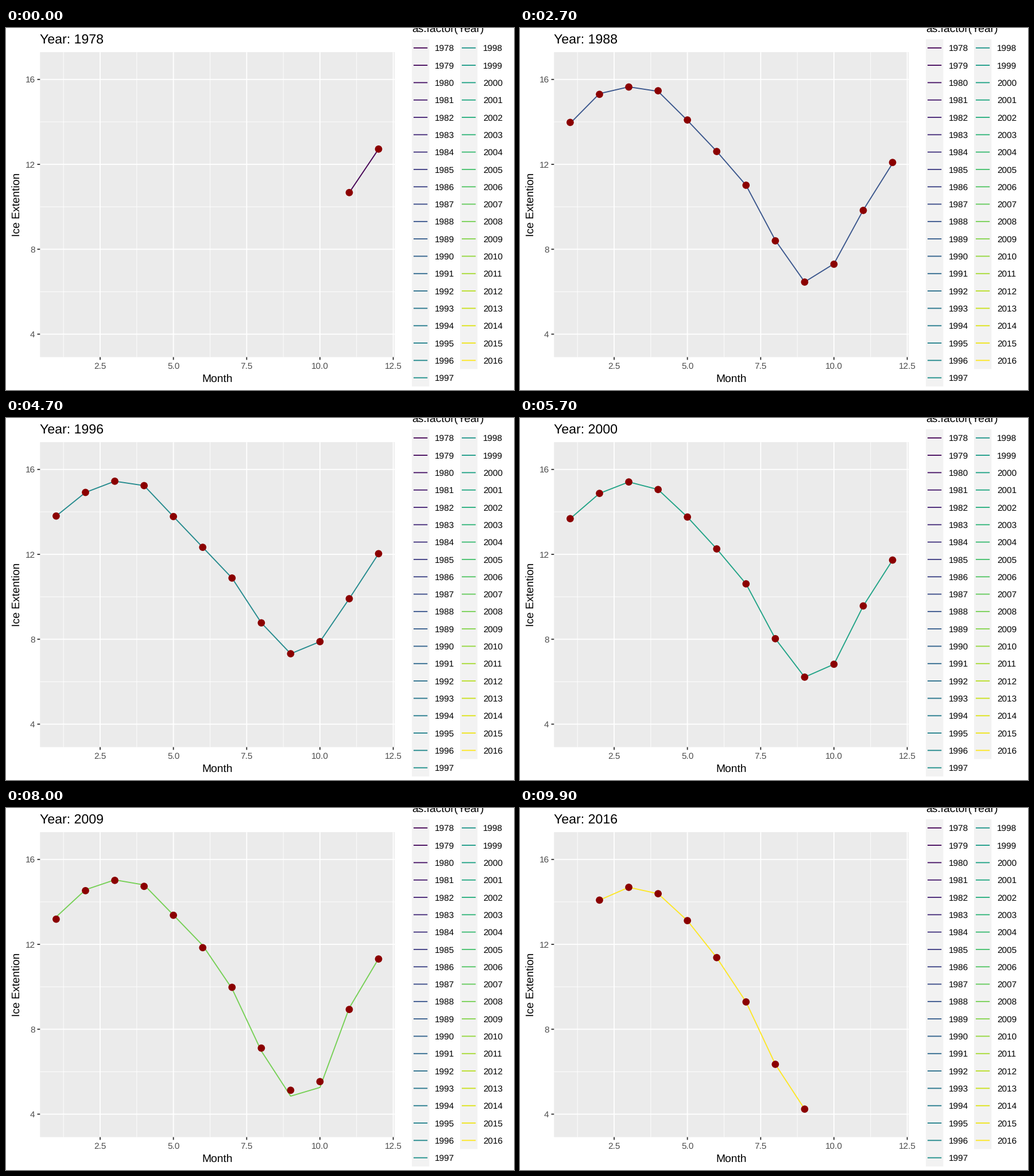
Write a matplotlib script that moves like this. It is 885 by 632 pixels and loops after 10 s.

```python
import matplotlib.pyplot as plt
import numpy as np
from matplotlib.animation import FuncAnimation
from matplotlib.patches import Circle, Rectangle

plt.rcParams.update({
    "font.family": "Liberation Sans",
    "text.hinting": "none",
    "path.snap": False,
})

W, H, DPI = 885, 632, 64
PX = 72 / DPI  # points per pixel
FRAMES = 100
YEARS = np.arange(1978, 2017)
MONTHS = np.arange(1, 13)
COLORS = plt.cm.viridis(np.linspace(0, 1, len(YEARS)))
LEFT, RIGHT, TOP, BOTTOM = 59.3, 677.2, 42.2, 574.6
STROKE = 1.87
BIG, MID, SMALL = 23.15, 19.3, 15.4  # text heights in pixels

# Typical seasons at both ends of the record
EARLY = np.array([14.15, 15.4, 15.75, 15.55, 14.15, 12.75, 11.3, 8.85, 7.15, 8.05, 10.1, 12.3])
LATE = np.array([12.75, 14.1, 14.75, 14.4, 13.1, 11.5, 9.3, 6.45, 4.4, 4.55, 8.6, 10.9])
# Turning points of the autumn low around its trend
SWING = {1979: .1, 1984: -.25, 1990: -.5, 1992: .6, 1993: -.25, 1996: 1,
         2000: .2, 2007: -.95, 2009: .1, 2012: -1.25, 2014: .5, 2016: -.1}


def to_x(month):
    return 36.35 + 51.06 * month


def to_y(extent):
    return 89.8 + 37.06 * (16 - extent)


def season(year, rng):
    """Monthly extents: a melting trend, an autumn swing and a little noise."""
    melt = ((year - 1979) / 37) ** 1.6
    swing = np.interp(year, list(SWING), list(SWING.values()))
    autumn = np.exp(-((MONTHS - 9.2) / 1.6) ** 2)
    return EARLY + (LATE - EARLY) * melt + swing * autumn + rng.normal(0, .05, 12)


def build_tracks():
    """Pixel positions of the monthly points, one array per year."""
    rng = np.random.default_rng(4)
    tracks = [np.column_stack([to_x(MONTHS[10:]), to_y(np.array([10.67, 12.72]))])]
    tracks += [np.column_stack([to_x(MONTHS), to_y(season(y, rng))]) for y in YEARS[1:]]
    tracks[-1] = tracks[-1][1:9]  # the last year runs from February to September
    return tracks


TRACKS = build_tracks()
KEYS = np.round((FRAMES - 1) * np.arange(len(YEARS)) / (len(YEARS) - 1)).astype(int)

fig = plt.figure(figsize=(W / DPI, H / DPI), dpi=DPI, facecolor="white")
ax = fig.add_axes([0, 0, 1, 1])
ax.set(xlim=(0, W), ylim=(H, 0))
ax.axis("off")


def box(x0, y0, x1, y1, color):
    ax.add_patch(Rectangle((x0, y0), x1 - x0, y1 - y0, fc=color, lw=0, zorder=0))


def seg(x0, y0, x1, y1, color, width=STROKE, z=2):
    ax.plot([x0, x1], [y0, y1], color=color, lw=width * PX, zorder=z,
            solid_capstyle="butt")


def text(x, y, label, size, color="black", ha="left", **kw):
    return ax.text(x, y, label, size=size * PX, color=color, ha=ha,
                   va="baseline", **kw)


def draw_panel():
    box(LEFT, TOP, RIGHT, BOTTOM, "#EBEBEB")
    for m in np.arange(1.25, 12, 2.5):
        seg(to_x(m), TOP, to_x(m), BOTTOM, "white", STROKE / 2, 1)
    for v in (6, 10, 14):
        seg(LEFT, to_y(v), RIGHT, to_y(v), "white", STROKE / 2, 1)
    for m in np.arange(2.5, 13, 2.5):
        x = to_x(m)
        seg(x, TOP, x, BOTTOM, "white")
        seg(x, BOTTOM, x, BOTTOM + 4.8, "#333333")
        text(x, 594.7, f"{m:.1f}", SMALL, "#4D4D4D", "center")
    for v in (4, 8, 12, 16):
        y = to_y(v)
        seg(LEFT, y, RIGHT, y, "white")
        seg(LEFT - 4.8, y, LEFT, y, "#333333")
        text(50.6, y + 5.5, str(v), SMALL, "#4D4D4D", "right")
    text((LEFT + RIGHT) / 2, 618, "Month", MID, ha="center")
    text(24, (TOP + BOTTOM) / 2, "Ice Extention", MID, ha="center",
         rotation=90, rotation_mode="anchor")


def draw_legend():
    key, top = 30.31, 19.6
    text(706.8, 7, "as.factor(Year)", MID)
    for x, first, count in ((707, 0, 20), (791, 20, 19)):
        box(x, top, x + key, top + key * count, "#F2F2F2")
        for row in range(count):
            y = top + key * (row + .5)
            seg(x + .1 * key, y, x + .9 * key, y, COLORS[first + row])
            text(x + key + 9.65, y + 5.5, str(YEARS[first + row]), SMALL)


draw_panel()
draw_legend()
title = text(LEFT, 27, "", BIG)
line, = ax.plot([], [], lw=STROKE * PX, zorder=3, solid_capstyle="butt",
                solid_joinstyle="round")
dots = [ax.add_patch(Circle((0, 0), 6.35, fc="#8B0000", lw=0, zorder=4))
        for _ in MONTHS]


def update(i):
    k = np.searchsorted(KEYS, i, "right") - 1
    now = pos = TRACKS[k]
    if i > KEYS[k]:
        # Points pair up by order; unpaired ones wait for their own year
        nxt = TRACKS[k + 1]
        n = min(len(now), len(nxt))
        t = (i - KEYS[k]) / (KEYS[k + 1] - KEYS[k])
        pos = now[:n] + (nxt[:n] - now[:n]) * t
    line.set_data(*now.T)
    line.set_color(COLORS[k])
    for j, dot in enumerate(dots):
        dot.set_visible(j < len(pos))
        if j < len(pos):
            dot.set_center(pos[j])
    year = YEARS[0] + (YEARS[-1] - YEARS[0]) * i / (FRAMES - 1)
    title.set_text(f"Year: {round(year)}")
    return [line, title, *dots]


anim = FuncAnimation(fig, update, frames=FRAMES, interval=100, repeat=True,
                     repeat_delay=0)
plt.show()
```
